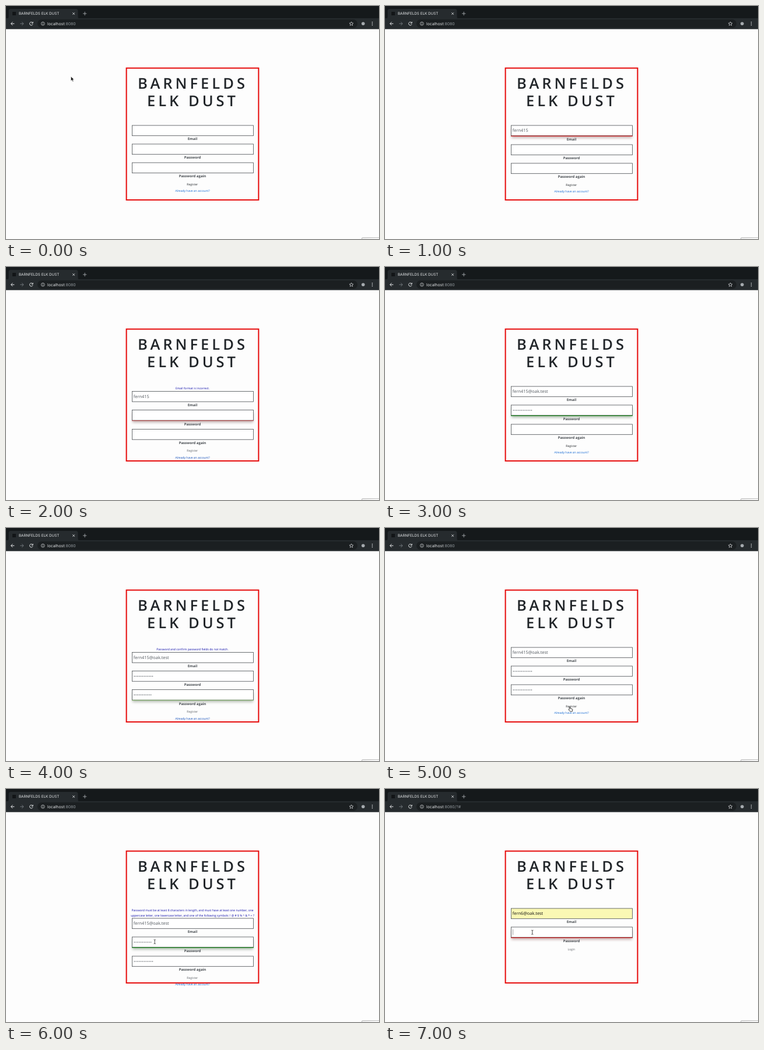
An HTML page for the animation above (8000 ms loop, 640 px wide and 400 px high).

```html
<!DOCTYPE html>
<html lang="en">
<head>
<meta charset="utf-8">
<title>Sign-up form</title>
<style>
  html, body { margin: 0; width: 100%; height: 100%; overflow: hidden; background: #fdfdfd; }
  svg { display: block; width: 640px; height: 400px; }
  text { font-family: "Open Sans", sans-serif; font-size: 5px; text-rendering: geometricPrecision; white-space: pre; }
  .ui { font-family: Inter, sans-serif; font-size: 6.3px; }
  .url { font-size: 6.9px; }
  .title { font-size: 25.5px; font-weight: 600; letter-spacing: 5px; fill: #212529; }
  .mid { text-anchor: middle; }
  .label { font-size: 6px; font-weight: 700; fill: #454a4f; }
  .value { font-size: 7.4px; fill: #50565c; }
  .error { fill: #0808a8; }
  .icon { fill: none; stroke: #e4e6e8; stroke-width: 1; }
  .scene { visibility: hidden; animation: show 8s step-end infinite; }
  @keyframes show { 0% { visibility: visible; } 12.5%, 100% { visibility: hidden; } }
</style>
</head>
<body>
<svg viewBox="0 0 640 400">
  <defs>
    <filter id="blur" x="-10%" y="-50%" width="120%" height="200%"><feGaussianBlur stdDeviation="1.9"/></filter>
    <path id="arrow" d="M0 0V7.6L1.8 6L3.1 8.8L4.3 8.2L3.1 5.5H5.4Z" fill="#111" stroke="#fff" stroke-width=".5"/>
    <path id="beam" d="M-1.6-3.6Q0-3.6 0-2.6Q0-3.6 1.6-3.6M0-2.6V2.6M-1.6 3.6Q0 3.6 0 2.6Q0 3.6 1.6 3.6" fill="none" stroke="#222" stroke-width=".8"/>
    <path id="hand" d="M1.5 0Q2.4 0 2.4 1V3.2L5.6 3.8Q6.4 4 6.3 5L5.8 8H2L-.6 4.9Q-.2 4 .7 4.7V1Q.7 0 1.5 0Z" fill="#fff" stroke="#111" stroke-width=".8"/>
  </defs>

  <rect width="640" height="400" fill="#fdfdfd"/>
  <rect width="640" height="22" fill="#15191b"/>
  <path d="M2 22Q4.500 21.500 4.500 18V8.500Q4.500 5 8 5H120Q123.500 5 123.500 8.500V18Q123.500 21.500 126 22Z" fill="#262b2e"/>
  <rect y="21" width="640" height="18.700" fill="#262b2e"/>
  <rect x="54" y="23" width="549" height="14.500" rx="7.200" fill="#1b1f21"/>
  <rect x="11" y="10" width="6" height="6" fill="#121517"/>
  <text class="ui" x="22" y="15.200" fill="#e6e8ea">BARNFELDS ELK DUST</text>
  <g class="icon">
    <path d="M114.200 11.200l3.800 3.800m0-3.800l-3.800 3.800" stroke-width=".8"/>
    <path d="M132 13h6.400M135.200 9.800v6.400" stroke-width=".8" stroke="#b8bcc0"/>
    <path d="M14.300 30.300H8.600M11.400 27.400L8.500 30.300L11.400 33.200"/>
    <path d="M24.300 30.300H30M27.200 27.400L30.100 30.300L27.200 33.200" stroke="#71777c"/>
    <path d="M45.500 28.500A2.800 2.800 0 1 0 46 31.200M46.200 27V29.400H43.700"/>
    <circle cx="63.300" cy="30.300" r="2.900" stroke-width=".7"/>
    <path d="M63.300 29.800v2M63.300 28.400v.8" stroke-width=".8"/>
    <path d="M592.600 27l1 2.200 2.400.2-1.800 1.600.5 2.400-2.100-1.300-2.100 1.300.5-2.400-1.800-1.600 2.400-.2z" stroke-width=".7"/>
  </g>
  <circle cx="612.800" cy="30.300" r="2.800" fill="#a5aaae"/>
  <g fill="#e4e6e8"><circle cx="628.500" cy="27.800" r=".8"/><circle cx="628.500" cy="30.300" r=".8"/><circle cx="628.500" cy="32.800" r=".8"/></g>

  <rect x="206.600" y="106.600" width="226.800" height="226.300" fill="none" stroke="#e60808" stroke-width="2"/>
  <text class="title mid" x="320.500" y="142.400">BARNFELDS</text>
  <text class="title mid" x="320.500" y="172.400">ELK DUST</text>
  <path d="M610.500 400V399Q610.500 397.700 612 397.700H640" fill="#eee" stroke="#aaa" stroke-width=".8"/>
  <g id="scenes"></g>
</svg>
<script>
const RED = '#dc0808', DIM_RED = '#b84040', GREEN = '#0a8a0a', PALE_GREEN = '#7cae62';
const LABELS = ['Email', 'Password', 'Password again'];
const PARTIAL = 'fern415', EMAIL = 'fern415@oak.test';
const FORMAT = ['Email format is incorrect.'];
const MATCH = ['Password and confirm password fields do not match.'];
const RULES = [
  'Password must be at least 8 characters in length, and must have at least one number, one',
  'uppercase letter, one lowercase letter, and one of the following symbols: ! @ # $ % ^ &amp; * + ?'
];

// values: email text, then password lengths; focus: [row, colour]
const scenes = [
  { values: ['', 0, 0], cursor: ['arrow', 111.4, 121] },
  { values: [PARTIAL, 0, 0], focus: [0, RED] },
  { values: [PARTIAL, 0, 0], focus: [1, DIM_RED], errors: FORMAT },
  { values: [EMAIL, 12, 0], focus: [1, GREEN] },
  { values: [EMAIL, 12, 11], focus: [2, PALE_GREEN], errors: MATCH },
  { values: [EMAIL, 12, 12], cursor: ['hand', 315.5, 306.8] },
  { values: [EMAIL, 11, 12], focus: [1, GREEN], errors: RULES, cursor: ['beam', 255.2, 262.2] },
  { values: ['fern6@oak.test', 0], focus: [1, RED], login: true, cursor: ['beam', 252.8, 246] }
];

const text = (cls, x, y, str, fill) =>
  `<text class="${cls}" x="${x}" y="${y}"${fill ? ` fill="${fill}"` : ''}>${str}</text>`;

function dots(n, y) {
  let out = '';
  for (let i = 0; i < n; i++) out += `<circle cx="${220.2 + i * 2.84}" cy="${y}" r=".8" fill="#50565c"/>`;
  return out;
}

function field(value, y, color, filled) {
  let out = '';
  if (color) out += `<rect x="217" y="${y + 4.5}" width="207" height="17" style="fill:color-mix(in srgb, ${color} 25%, #666)" opacity=".45" filter="url(#blur)"/>`;
  out += `<rect x="216.500" y="${y}" width="208" height="17.700" fill="${filled ? '#faf8b4' : '#fff'}" stroke="#484c50" stroke-width=".8"/>`;
  if (color) out += `<path d="M216 ${y + 18.3}H425" stroke="${color}" stroke-width="1.100"/>`;
  return out + (typeof value === 'string'
    ? `<text class="value" x="218.800" y="${y + 11.4}"${filled ? ' style="fill:#111"' : ''}>${value}</text>`
    : dots(value, y + 9));
}

function draw({ values, focus = [], errors = [], login, cursor }) {
  let y = 205 + errors.length * 8.5;
  let out = text('ui url', 71, 32.7, `localhost<tspan fill="#92989d">:8080${login ? '/?#' : ''}</tspan>`, '#e6e8ea');
  errors.forEach((line, i) => out += text('error mid', 320, 210.4 + i * 8.5, line));
  values.forEach((value, i) => {
    const active = focus[0] === i;
    out += field(value, y, active && focus[1], login && i === 0);
    if (active) y += 1;
    out += text('label mid', 320, y + 25, LABELS[i]);
    y += 32;
  });
  const idle = errors.length || login;
  out += text('mid', 319.8, y + 6.6, login ? 'Login' : 'Register', idle ? '#5c6166' : '#212529');
  if (login) out += '<path d="M219.500 241V250.500" stroke="#777" stroke-width=".7"/>';
  else out += text('mid', 320, y + 18, 'Already have an account?', errors.length ? '#0648b8' : '#0a62d0');
  if (cursor) out += `<use href="#${cursor[0]}" x="${cursor[1]}" y="${cursor[2]}"/>`;
  return out;
}

document.getElementById('scenes').innerHTML = scenes.map((scene, i) =>
  `<g class="scene" style="animation-delay:${i - scenes.length}s">${draw(scene)}</g>`).join('');
</script>
</body>
</html>
```
